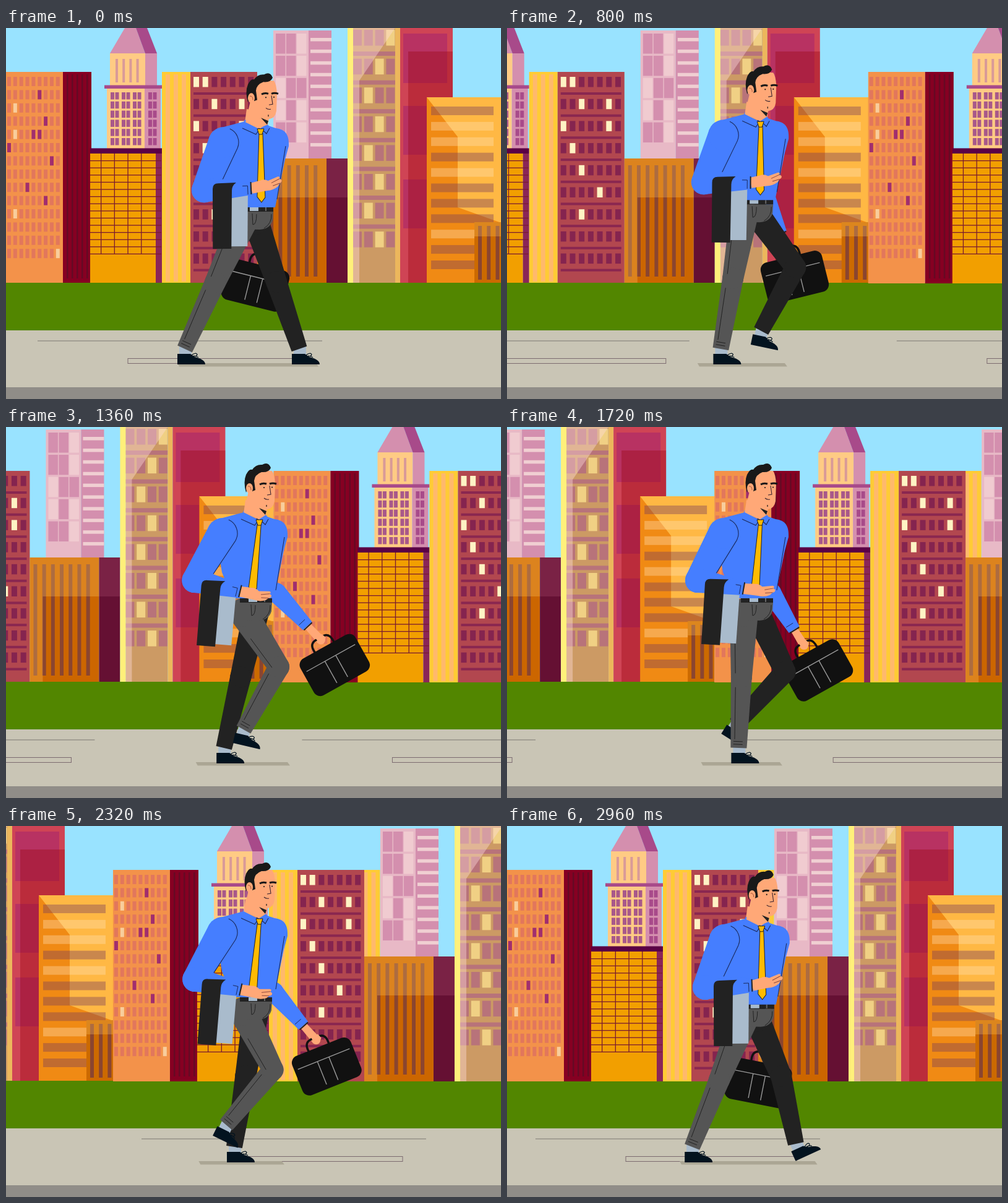
Animation of 800x600 px, one loop 3000 ms. Source, as an HTML page with a canvas:

```html
<!DOCTYPE html>
<html lang="en">
<head>
<meta charset="utf-8">
<title>City walk</title>
<style>
html, body { margin: 0; width: 100%; height: 100%; overflow: hidden; background: #99e3ff; }
canvas { display: block; }
</style>
</head>
<body>
<canvas id="stage" width="800" height="600"></canvas>
<script>
const g = document.getElementById('stage').getContext('2d');
const LOOP = 3000, STEP = 40, CYCLE = 1000;
const SPEED = 800 / 2960;

// ---------- drawing helpers ----------
function box(color, x, y, w, h) {
  g.fillStyle = color;
  g.fillRect(x, y, w, h);
}
function poly(color, ...p) {
  g.fillStyle = color;
  g.beginPath();
  for (let i = 0; i < p.length; i += 2) g.lineTo(p[i], p[i + 1]);
  g.fill();
}
function line(color, width, ...p) {
  g.strokeStyle = color;
  g.lineWidth = width;
  g.beginPath();
  for (let i = 0; i < p.length; i += 2) g.lineTo(p[i], p[i + 1]);
  g.stroke();
}
function shape(color, d) {
  g.fillStyle = color;
  g.fill(new Path2D(d));
}
function curve(color, width, d) {
  g.strokeStyle = color;
  g.lineWidth = width;
  g.stroke(new Path2D(d));
}
function dot(color, x, y, rx, ry = rx) {
  g.fillStyle = color;
  g.beginPath();
  g.ellipse(x, y, rx, ry, 0, 0, 7);
  g.fill();
}
function bars(color, n, x, y, w, h, dx, dy) {
  for (let i = 0; i < n; i++) box(color, x + i * dx, y + i * dy, w, h);
}
// Rows and columns of windows; pick(row, col) gives the colour
function grid(rows, cols, x, y, w, h, dx, dy, pick) {
  for (let r = 0; r < rows; r++) for (let c = 0; c < cols; c++)
    box(pick(r, c), x + c * dx, y + r * dy, w, h);
}
function at(x, y, deg, draw) {
  g.save();
  g.translate(x, y);
  g.rotate(deg * Math.PI / 180);
  draw();
  g.restore();
}
function turn(x, y, deg) {
  const a = deg * Math.PI / 180, c = Math.cos(a), s = Math.sin(a);
  return [x * c - y * s, x * s + y * c];
}
// Point along a-b, pushed sideways by off
function along(a, b, k, off = 0) {
  const dx = b[0] - a[0], dy = b[1] - a[1], l = Math.hypot(dx, dy) || 1;
  return [a[0] + dx * k + dy / l * off, a[1] + dy * k - dx / l * off];
}
function limb(color, a, b, ra, rb, roundEnd) {
  poly(color, ...along(a, b, 0, ra), ...along(a, b, 1, rb),
    ...along(a, b, 1, -rb), ...along(a, b, 0, -ra));
  dot(color, ...a, ra);
  if (roundEnd) dot(color, ...b, rb);
}

// ---------- city ----------
function orangeBlock(end) {
  const plum = [14, 33, 40, 41, 45, 61, 75, 87], pale = [19, 37, 91, 125];
  box('#f3924a', 0, 71, 92, end - 71);
  grid(14, 9, 2, 79, 6, 15, 9.85, 21.4, (r, c) => {
    const i = r * 9 + c;
    return plum.includes(i) ? '#a12e6e' : pale.includes(i) ? '#f8cd9c' : '#e2775c';
  });
  box('#860022', 92, 71, 46, end - 71);
  bars('#650a24', 5, 98, 75, 2.5, 330, 8, 0);
}

function tower() {
  poly('#d48fae', 168, 41, 192, 0, 210, 0, 225, 41);
  poly('#a84a8a', 210, 0, 228, 0, 244, 41, 225, 41);
  box('#ffcb84', 168, 41, 57, 52);
  box('#d48fae', 225, 41, 19, 52);
  bars('#d99a98', 4, 177, 50, 4, 38, 11.2, 0);
  box('#ffcb84', 163, 98, 61, 97);
  box('#d48fae', 224, 98, 26, 97);
  box('#a84a8a', 159, 92.5, 93, 5.5);
  for (const x of [169, 187, 205]) grid(6, 2, x, 104, 6, 11.5, 7.5, 14.8, () => '#a8588a');
  grid(6, 2, 230, 104, 6, 11.5, 7.5, 14.8, () => '#a84a8a');
}

function amberBlock(end) {
  box('#f29f00', 136, 203, 106, end - 203);
  box('#8a2558', 242, 203, 10, end - 203);
  box('#5a0045', 136, 194.5, 116, 8.5);
  bars('#7a1c30', 14, 136, 214, 115, 1.3, 0, 11.6);
  bars('#7a1c30', 4, 153, 203, 1.3, 162, 21.7, 0);
}

function yellowBlock(x, end) {
  box('#ffcb35', x, 71, 46, end - 71);
  bars('#ffb96c', 3, x + 6, 75, 7, end - 77, 13, 0);
}

function maroonBlock(end) {
  const lit = [0, 1, 9, 12, 14, 19, 22, 30, 39, 44];
  box('#b2474f', 298, 71, 108, end - 71);
  grid(9, 7, 303, 79, 9, 16.5, 14.7, 35.7, (r, c) => lit.includes(r * 7 + c) ? '#fff3c4' : '#85244f');
  bars('#8a2750', 9, 303, 104, 98, 4, 0, 35.7);
}

function pinkBlock() {
  box('#e8b9c6', 432, 4, 57, 207);
  box('#d48fae', 489, 4, 37, 207);
  grid(5, 3, 436, 9, 15.5, 32.5, 17, 35.9, (r, c) =>
    c === 2 && r !== 2 || c === 0 && (r === 2 || r === 3) ? '#f0cbd0' : '#d48fae');
  bars('#f0cfd2', 10, 492, 16, 34, 5.5, 0, 18.9);
}

function brownBlock(end) {
  const glow = 'rgba(255,200,100,.3)';
  box('#cc6600', 406, 211, 112, end - 211);
  bars('#8a4530', 7, 412, 222, 6, 180, 14.2, 0);
  box(glow, 406, 211, 112, 63);
  box(glow, 406, 274, 21, end - 274);
  box('#7a2245', 518, 211, 34, 63);
  box('#651033', 518, 274, 34, end - 274);
}

function creamTower(end) {
  box('#cc9a64', 561, 0, 68, end);
  // One lit window per floor, alternating sides
  grid(8, 4, 561, 3, 14, 25.5, 17.8, 46.6, (r, c) => c === (r ? 1 + r % 2 : 3) ? '#f0d084' : '#b8737a');
  bars('#b8737a', 7, 561, 38, 68, 7, 0, 46.6);
  poly('rgba(255,220,222,.4)', 561, 0, 629, 0, 571, 85, 571, end, 561, end);
  box('#fff07a', 552, 0, 9, end);
  box('#ecb75c', 629, 0, 8, end);
}

function redBlock(end) {
  box('#cf4455', 637, 0, 85, end);
  box('#b83262', 642, 9, 71, 80);
  bars('#b83262', 2, 642, 126, 38, 79, 0, 119);
  box('rgba(153,5,16,.37)', 650, 38, 72, end - 38);
}

function goldBlock(end) {
  box('#f08a14', 680, 112, 120, end - 112);
  poly('#ffb844', 680, 112, 800, 112, 800, 315, 730, 290, 730, 176);
  // Floors 1, 2, 4 and 8 catch the light
  for (let i = 0; i < 11; i++) {
    const bright = i && !(i & (i - 1));
    box(bright ? 'rgba(255,225,180,.36)' : 'rgba(120,60,90,.4)', 687, 127 + i * 24.9, 101, 14);
  }
  box('#cc6a00', 757, 314, 43, end - 314);
  bars('#8a4530', 3, 763, 320, 6, 87, 14.2, 0);
  box('rgba(255,200,100,.3)', 757, 314, 43, 23);
}

function city(x, again) {
  const end = again ? 413 : 412;
  g.save();
  g.translate(x, 0);
  if (again) yellowBlock(385.5, end);
  orangeBlock(end);
  tower();
  amberBlock(end);
  yellowBlock(252, end);
  maroonBlock(end);
  pinkBlock();
  brownBlock(end);
  creamTower(end);
  redBlock(end);
  goldBlock(end);
  g.restore();
}

function ground(shift) {
  box('#c9c5b5', 0, 489, 800, 92);
  box('#908d88', 0, 581, 800, 19);
  for (const x of [-shift, 795 - shift]) {
    line('#7d7873', 1, 51 + x, 506, 511 + x, 506);
    g.strokeStyle = '#7c6b70';
    g.strokeRect(197 + x, 534.5, 276, 8);
  }
}

// ---------- walk cycle (u runs 0..1 over two steps) ----------
const BLUE = '#457eff', SKIN = '#ffa877', INK = '#1b2a5c', BLACK = '#222', STEEL = '#a9bbcc';
const THIGH = 106, SHIN = 117, FRONT = 474, BACK = 289;
const FAR = { strike: 0, drag: -.08, lag: 1, kick: .5, hip: 404, color: BLACK };
const NEAR = { strike: .5, drag: .1, lag: 2.1, kick: .8, hip: 383, color: '#555', seams: true };

const wave = (u, n = 1) => Math.cos(2 * Math.PI * n * u);
const clamp = v => Math.max(0, Math.min(1, v));
const smooth = v => v * v * (3 - 2 * v);
const mix = (a, b, k) => a + (b - a) * k;

// Planted foot slides back, then swings forward with a lift and a roll
function footPose(u, o) {
  const w = (u - o.strike + 1) % 1 * 2;
  if (w <= 1) return { x: mix(FRONT, BACK, w + o.drag * Math.sin(Math.PI * w)), y: 528, r: 0, bend: 0 };
  const s = w - 1, k = s ** o.kick;
  return {
    x: mix(BACK, FRONT, smooth(s ** o.lag)),
    y: 528 - 45 * Math.sin(Math.PI * k),
    r: 54 * Math.sin(1.2 * Math.PI * k),
    bend: clamp(Math.min(5 * s, 3.5 * (1 - s)))
  };
}

function bodyPose(u) {
  const c = wave(u), c2 = wave(u, 2);
  const reach = Math.tanh(3 * c);
  const bob = 9 * Math.max(0, c2) + 4 * Math.max(0, c);
  return {
    bob,
    bag: [483 - 74 * c - 6 * c2, 397 + 19 * c],
    bagTilt: -16 + 31 * wave(u - .04),
    farElbow: [423 - 22 * c, 268 + bob],
    elbow: [312 + 8 * reach, 248 + bob * 1.1],
    wrist: [387 + 9 * reach, 256 - 10 * reach + bob],
    hand: -4 - 12 * reach,
    shade: [299 - 14 * c2 - 8 * c, 470 + 25 * c2 + 10 * c]
  };
}

// Knee from hip and ankle by the two bone lengths
function kneeOf(hip, ankle, bend) {
  const d = Math.hypot(ankle[0] - hip[0], ankle[1] - hip[1]);
  const a = (THIGH ** 2 + d * d - SHIN ** 2) / (2 * d);
  const h = Math.sqrt(Math.max(0, THIGH ** 2 - a * a));
  return along(hip, ankle, a / d, h * bend);
}

function leg(u, o, bob) {
  const f = footPose(u, o);
  const [ox, oy] = turn(0, -9, f.r);
  const hip = [o.hip, 300 + bob], ankle = [f.x + ox, f.y + oy];
  const knee = kneeOf(hip, ankle, f.bend);
  at(f.x, f.y, f.r, () => {
    box(STEEL, -9, -14, 20, 17);
    shape('#03131f', 'M-12 -1 L-12 16 L33 16 C33 9 24 6 16 4 L9 -1 Z');
    curve('#03131f', 1.2, 'M11 1 Q18 -4 20 0 Q19 4 14 2 M14 3 Q20 2 22 5');
  });
  limb(o.color, hip, knee, o.seams ? 23 : 21, 17, true);
  limb(o.color, knee, ankle, 17, 13);
  if (!o.seams) return;
  line(BLACK, 1, ...along(hip, knee, .4, -13), ...along(hip, knee, .95, -10));
  line(BLACK, 1, ...along(knee, ankle, .15, -9), ...along(knee, ankle, .88, -7));
  for (const k of [.91, .95]) line(BLACK, 1, ...along(knee, ankle, k, -9), ...along(knee, ankle, k, 6));
}

function farArm(b) {
  const [ox, oy] = turn(0, -46, b.bagTilt);
  const hand = [b.bag[0] + ox, b.bag[1] + oy];
  const across = (k, l, r) => [...along(b.farElbow, hand, k, l), ...along(b.farElbow, hand, k, r)];
  const cuff = along(b.farElbow, hand, .7);
  limb(SKIN, cuff, hand, 6, 7, true);
  limb(BLUE, b.farElbow, cuff, 16, 10);
  line(BLACK, 2, ...across(.71, 9, -9));
  line(INK, 1, ...across(.6, 4, -9));
  at(...b.bag, b.bagTilt, () => {
    curve('#111', 3.5, 'M-18 -33 Q-20 -49 -8 -50 L8 -50 Q18 -49 17 -33');
    g.fillStyle = '#111';
    g.beginPath();
    g.roundRect(-51, -34, 102, 68, 12);
    g.fill();
    line('#999', 1.4, -45, -13, 45, -13);
    for (const x of [-11, 9]) line('#999', 1.4, x, -13, x, 27);
    poly(SKIN, -6, -53, 6, -54, 9, -46, 5, -42, -5, -43);
  });
}

function torso(b) {
  at(b.bob * .15, b.bob, 0, () => {
    shape('#555', 'M376 284 H430 L429 298 Q425 312 408 313 L376 312 Z');
    curve(BLACK, 1, 'M396 287 L397 305 Q403 305 403 288 M427 288 Q428 303 415 311');
    box(BLACK, 378, 276, 52, 8);
    box(STEEL, 392, 277, 14, 6);
    box('#666', 417, 277, 2, 6);
    shape(BLUE, 'M350 147 L384 138 L422 145 L434 149 C450 151 456 160 455 178 L449 200 L433 277 L366 277 L349 235 L340 180 Z');
    curve(INK, 1.1, 'M450 178 L436 264');
    shape(SKIN, 'M387 118 L384 140 L405 152 L420 146 L421 126 Z');
    at(410, 150, (b.hand + 16) * .26, () => {
      poly('#ffbb00', -3, 7, 3, 7, 7, 111, 1, 119, -6, 110);
      line(BLACK, 1, -3, 7, -6, 110, 1, 119, 7, 111, 3, 7);
    });
    shape(BLUE, 'M384 135 L379 149 L402 159 L408 150 Z M408 150 L419 158 L425 148 L420 142 Z');
    curve(INK, 1.1, 'M380 149 L402 159 L408 150 L388 138 M411 150 L419 158 L424 149');
    poly('#ffbb00', 404, 150, 415, 150, 412, 159, 407, 159);
    line(BLACK, 1, 404, 150, 415, 150, 412, 159, 407, 159, 404, 150);
  });
}

function head(b) {
  at(b.bob * .23, b.bob * 1.1, 0, () => {
    shape(SKIN, 'M391 82 Q402 68 430 71 Q434 76 435 92 L434 120 Q432 132 422 133 L420 142 L404 148 L384 138 L392 104 Z');
    poly(BLACK, 409, 131, 421, 136, 419, 142);
    shape('#191919', 'M388 106 Q383 89 388 77 Q393 67 398 69 Q404 60 414 61 Q424 55 428 66 Q425 74 413 73 Q402 77 401 87 L403 102 L398 104 L397 95 L391 97 Z');
    dot(SKIN, 393.5, 99, 5.5, 8);
    curve('#a5573c', 1, 'M391 96 Q396 95 396 102');
    curve('#191919', 3, 'M410 93 Q415 90 421 92 M426 92 Q431 90 437 92');
    dot('#191919', 417, 98, 1.1);
    dot('#191919', 430, 97.5, 1.1);
    curve('#3a2430', 1.1, 'M426 95 L428 109 L422 110 M417 115 Q420 118 425 117');
    line('#191919', 1.2, 421, 126, 421, 129);
  });
}

function nearArm(b) {
  const { elbow, wrist } = b;
  const shoulder = [350 + b.bob * .15, 172 + b.bob];
  const coat = draw => at(wrist[0] - 62, wrist[1] - 15 - b.hand * .45, 3 + b.hand * .2, draw);
  limb(BLUE, shoulder, elbow, 25, 20, true);
  const aim = Math.atan2(elbow[1] - shoulder[1], elbow[0] - shoulder[0]) - Math.PI / 2;
  g.strokeStyle = INK;
  g.lineWidth = 1.1;
  g.beginPath();
  g.arc(...shoulder, 24, -1.15, aim);
  g.lineTo(...along(shoulder, elbow, .72, 21));
  g.stroke();
  coat(() => shape(STEEL, 'M28 102 L28 6 L36 0 H50 Q57 1 57 9 L56 102 Z'));
  at(...wrist, b.hand, () => {
    shape(SKIN, 'M0 -8 L18 -8 Q24 -9 30 -4 L47 -6 Q51 -5 48 -2 L51 0 Q52 4 47 5 L43 9 Q34 13 24 11 L0 9 Z');
    curve('#8a4a3c', 1, 'M34 1 L48 -2 M35 6 L47 5');
  });
  limb(BLUE, elbow, wrist, 20, 11);
  line(BLACK, 2, ...along(elbow, wrist, 1, 10), ...along(elbow, wrist, 1, -10));
  line(INK, 1, ...along(elbow, wrist, .82, 4), ...along(elbow, wrist, .93, 4), ...along(elbow, wrist, .93, -10));
  coat(() => shape(BLACK, 'M0 9 Q0 0 9 0 L38 -1 Q31 4 31 12 L30 106 L0 106 Z'));
}

function man(u) {
  const b = bodyPose(u), [l, r] = b.shade;
  poly('#aba694', l, 542, r - 4, 542, r, 547.5, l + 3, 547.5);
  farArm(b);
  leg(u, FAR, b.bob);
  leg(u, NEAR, b.bob);
  torso(b);
  head(b);
  nearArm(b);
}

function frame(now) {
  const t = Math.floor(now % LOOP / STEP) * STEP;
  const shift = t * SPEED;
  box('#99e3ff', 0, 0, 800, 412);
  box('#528600', 0, 412, 800, 77);
  city(-shift, false);
  if (shift > 0) city(800 - shift, true);
  ground(shift);
  man(t % CYCLE / CYCLE);
}

const start = performance.now();
function tick() {
  frame(performance.now() - start);
  requestAnimationFrame(tick);
}
tick();
</script>
</body>
</html>
```
